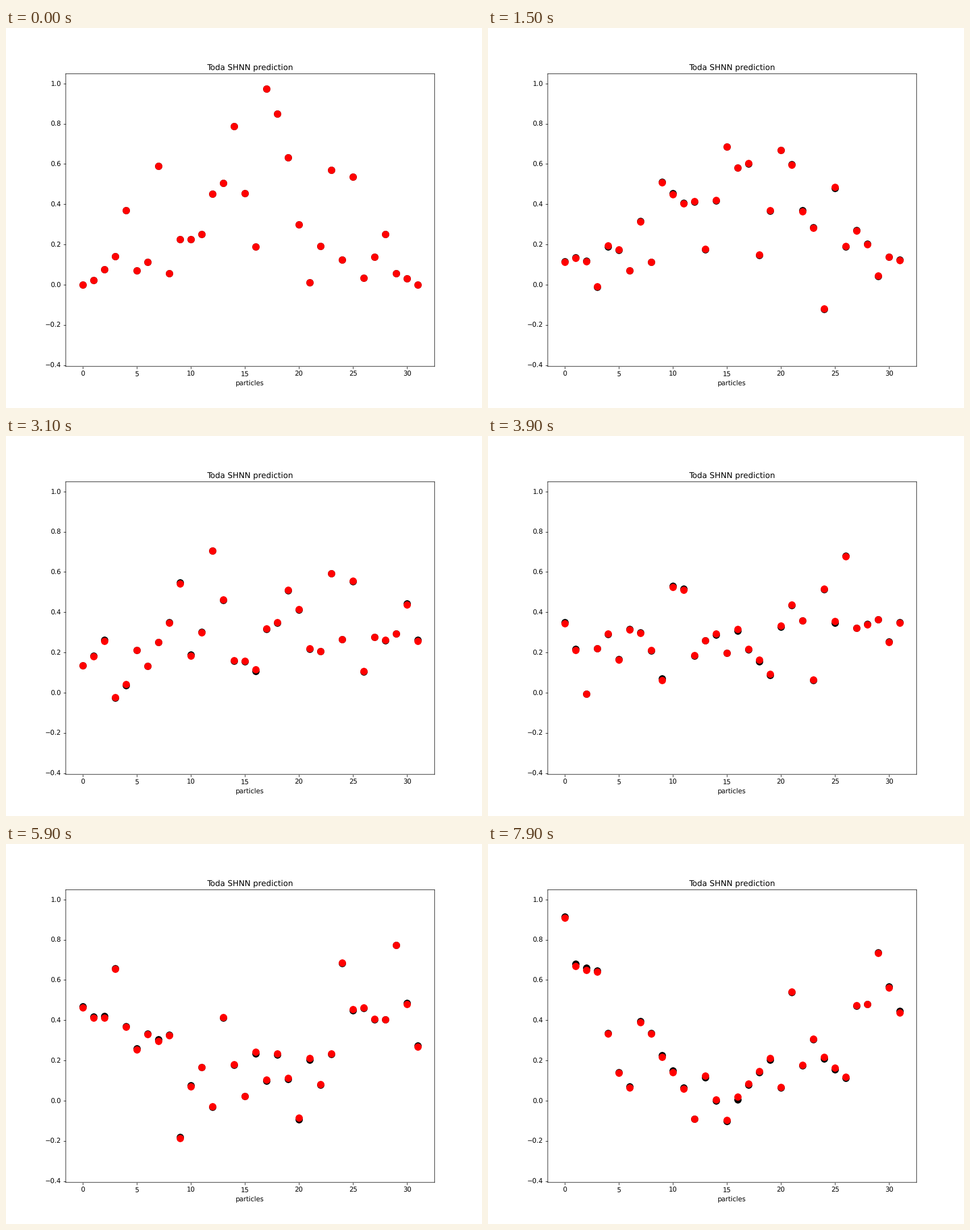
Write a matplotlib script that moves like this. It is 837x669 px and loops after 8 s.

```python
import numpy as np
import matplotlib.pyplot as plt
from matplotlib.animation import FuncAnimation

W, H, DPI = 837, 669, 83.7
FRAMES, INTERVAL = 80, 100
DT, SUBSTEPS = 0.2, 20
COUPLING_ERROR = 0.0026

plt.rcParams.update({
    "path.snap": False,
    "text.hinting": "no_hinting",
    "axes.linewidth": .72,
    "xtick.major.width": .72,
    "ytick.major.width": .72,
    "xtick.major.pad": 3,
})

# Initial displacements; the lattice is released from rest
START = np.array([
    0, .023, .077, .141, .370, .070, .112, .591,
    .055, .227, .226, .252, .451, .504, .789, .455,
    .190, .974, .851, .631, .298, .010, .192, .571,
    .123, .535, .034, .138, .252, .055, .030, 0])
N = len(START)


def force(q, coupling):
    """Toda force on a periodic chain."""
    bond = coupling * np.exp(q - np.roll(q, -1))
    return np.roll(bond, 1) - bond


def simulate(coupling):
    """Leapfrog integration, one row of displacements per frame."""
    q, p = START.copy(), np.zeros(N)
    h = DT / SUBSTEPS
    rows = [q.copy()]
    for _ in range(FRAMES - 1):
        for _ in range(SUBSTEPS):
            p += h / 2 * force(q, coupling)
            q += h * p
            p += h / 2 * force(q, coupling)
        rows.append(q.copy())
    return np.array(rows)


# The prediction follows the same law with slightly wrong couplings
rng = np.random.default_rng(4)
exact = simulate(np.ones(N))
predicted = simulate(1 + COUPLING_ERROR * rng.standard_normal(N))

# The small surplus guards against rounding down a pixel
fig, ax = plt.subplots(figsize=((W + .01) / DPI, (H + .01) / DPI), dpi=DPI)
fig.subplots_adjust(left=.1255, right=.9005, bottom=.1094, top=.8794)
ax.set_xlim(-1.55, 32.55)
ax.set_ylim(-.4064, 1.0484)
ax.set_yticks(np.arange(-2, 6) / 5)
ax.set_title("Toda SHNN prediction")
ax.set_xlabel("particles", labelpad=3.5)

x = np.arange(N)
truth, = ax.plot(x, exact[0], "o", color="black", markersize=10)
guess, = ax.plot(x, predicted[0], "o", color="red", markersize=10)


def update(i):
    truth.set_ydata(exact[i])
    guess.set_ydata(predicted[i])
    return truth, guess


anim = FuncAnimation(fig, update, frames=FRAMES, interval=INTERVAL,
                     repeat=True, repeat_delay=0)
plt.show()
```
